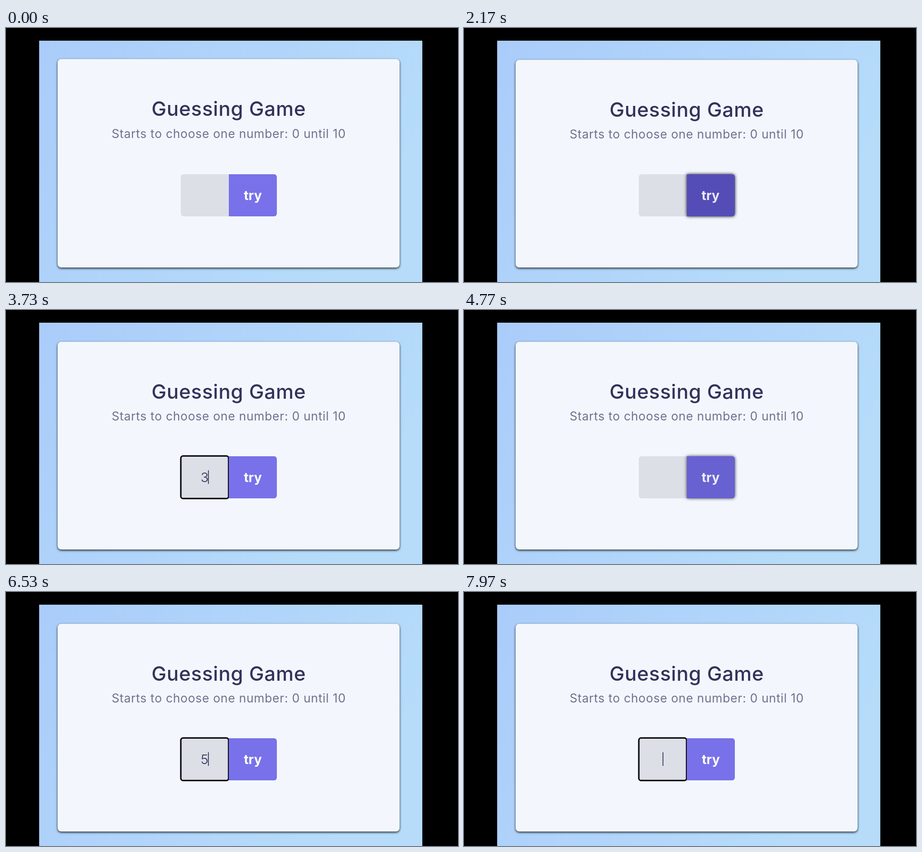
Write an HTML page that moves like this. It is 998 px wide and 561 px high and loops after 8000 ms.

```html
<!DOCTYPE html>
<html lang="en">
<head>
<meta charset="utf-8">
<title>Guessing Game</title>
<style>
  html, body { margin: 0; width: 100%; height: 100%; overflow: hidden; background: #000; }
  svg { display: block; width: 100%; height: 100%; }
  text { font-family: Inter, "Open Sans", sans-serif; text-anchor: middle; }
  #card { filter: drop-shadow(0 2.5px 2.8px rgba(0, 0, 0, .85)); }
  #title { font-size: 44px; font-weight: 550; letter-spacing: .7px; fill: #34325a; }
  #hint { font-size: 26.5px; font-weight: 400; letter-spacing: .7px; fill: #70718f; }
  #guess { font-size: 29px; font-weight: 300; fill: #302d55; }
  #label { font-size: 28.5px; font-weight: 700; }
</style>
</head>
<body>
<svg viewBox="0 0 998 561">
  <defs>
    <linearGradient id="sky" x2="1" y2=".4">
      <stop stop-color="#aaccfa"/>
      <stop offset="1" stop-color="#b6dcfa"/>
    </linearGradient>
  </defs>
  <rect width="998" height="561"/>
  <rect x="73.2" y="28" width="846" height="533" fill="url(#sky)"/>
  <rect id="card" x="114" width="755" rx="8" fill="#f3f7fd"/>
  <g id="heading">
    <text id="title" x="491.8" y="195.5">Guessing Game</text>
    <text id="hint" x="491.8" y="244.3">Starts to choose one number: 0 until 10</text>
  </g>
  <path d="M492 323H392a6 6 0 0 0-6 6V410a6 6 0 0 0 6 6H492Z" fill="#dcdfe6"/>
  <rect id="ring" x="386" y="322.4" width="105.5" height="94" rx="5" fill="none" stroke="#0b0b10" stroke-width="3.3"/>
  <text id="guess" x="438.5" y="379.5"></text>
  <rect id="caret" y="354" width="1.7" height="30" fill="#302d55"/>
  <path id="button" d="M492 323H592a6 6 0 0 1 6 6V410a6 6 0 0 1-6 6H492Z"/>
  <text id="label" y="380">try</text>
</svg>
<script>
const LOOP = 8000, BLINK = 530, FADE = 400, CLEAR_DELAY = 80;
const $ = id => document.getElementById(id);

// Times in ms: field focused, digit typed, pointer enters button, click, pointer leaves.
const rounds = [
  [720, 1400, 1560, 1800, 1980],
  [2180, 2520, 2875, 3160, 3330],
  [3450, 3620, 4080, 4350, 4500],
  [4800, 5040, 5360, 5680, 5900],
  [6150, 6420, 6720, 7060, 7400],
  [7600, Infinity, Infinity, Infinity, Infinity]
];

const smooth = x => {
  const u = Math.min(1, Math.max(0, x));
  return u * u * (3 - 2 * u);
};
const mix = (from, to, k) => `rgb(${from.map((c, i) => Math.round(c + (to[i] - c) * k))})`;
const show = (id, on) => $(id).setAttribute('visibility', on ? 'visible' : 'hidden');

function draw(t) {
  let hover = 0, focused = false, digit = '', caretStart = 0;
  rounds.forEach(([focus, type, enter, click, leave], i) => {
    hover += smooth((t - enter) / FADE) - smooth((t - leave) / FADE);
    if (t >= focus && t < click) {
      focused = true;
      caretStart = t >= type ? type : focus;
    }
    if (t >= type && t < click + CLEAR_DELAY) digit = String(i + 1);
  });

  const lift = t < 400 ? 1.7 : 0;
  $('card').setAttribute('y', 70.3 - lift);
  $('card').setAttribute('height', 458.7 + lift);
  $('heading').setAttribute('transform', `translate(0 ${-lift})`);

  show('ring', focused);
  show('caret', focused && (t - caretStart) % (2 * BLINK) < BLINK);
  $('caret').setAttribute('x', digit ? 446 : 438.5);
  $('guess').textContent = digit;

  const glow = Math.min(.9, hover * 3);
  $('button').setAttribute('fill', mix([120, 113, 233], [55, 46, 139], hover));
  $('button').style.filter = hover > .001 ? `drop-shadow(0 0 3.5px rgba(0,0,0,${glow}))` : 'none';
  $('label').setAttribute('x', 545 - glow * .7);
  $('label').setAttribute('fill', mix([255, 255, 255], [232, 230, 245], glow));
}

function tick() {
  draw(performance.now() % LOOP);
  requestAnimationFrame(tick);
}
tick();
</script>
</body>
</html>
```
